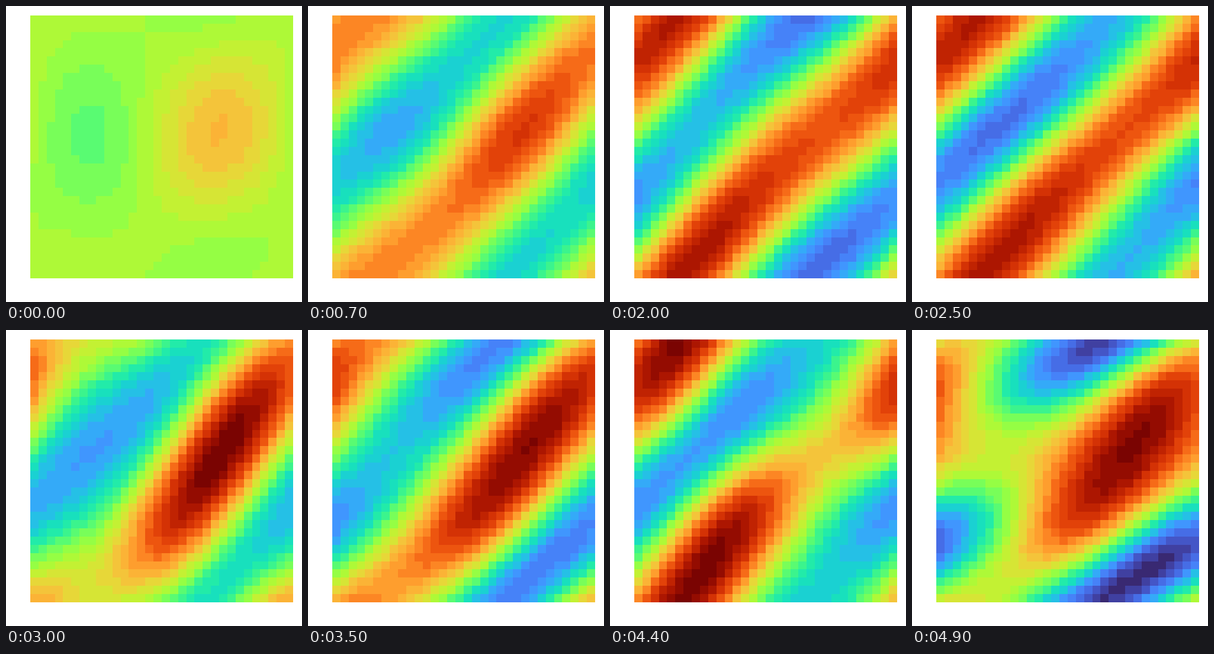
These frames come from a looping animation (500x500 px, 5 s). A matplotlib script:

```python
import numpy as np
import matplotlib.pyplot as plt
from matplotlib.animation import FuncAnimation

CELLS, LEVELS = 32, 32
FRAMES, INTERVAL = 50, 100

# Resting phases, in degrees, of the main diagonal wave and its disturbances.
MAIN, ACROSS, DOWN, COUNTER = 46, 76, 147, 98

y, x = np.mgrid[:CELLS, :CELLS] * 2 * np.pi / CELLS


def wave(kx, ky, phase):
    """Plane wave that fits the periodic square kx by ky times."""
    return np.cos(kx * x + ky * y - np.radians(phase))


def swing(t, peak, period):
    return np.cos(2 * np.pi * (t - peak) / period)


def field_at(t):
    """Colour levels of all cells after t seconds."""
    growth = 1 / (1 + 8 * np.exp(-4.4 * t))
    across = (5.3 * np.exp(-((t - 3.6) / 1.5) ** 2) * swing(t, 4.15, 2.1)
              - 1.7 * np.exp(-(t / 1.3) ** 2))
    down = (1.2 + 5.5 * (t / 4.9) ** 5) * swing(t, 4.9, 1.55)
    counter = 0.9 - 0.4 * t
    # The disturbances drain the main wave and couple with it.
    main = growth * (11 - 0.13 * across ** 2 - 0.05 * down ** 2)

    field = (16.1 + 0.5 * growth
             + main * wave(1, 1, MAIN)
             + across * wave(1, 0, ACROSS)
             + down * wave(0, 1, DOWN)
             + counter * wave(1, -1, COUNTER)
             + 0.055 * main * across * wave(2, 1, MAIN + ACROSS)
             - 0.04 * main * down * wave(1, 2, MAIN + DOWN))
    return np.clip(np.rint(field), 0, LEVELS - 1)


fig = plt.figure(figsize=(5, 5), dpi=100, facecolor="white")
ax = fig.add_axes([41 / 500, 40 / 500, 444 / 500, 444 / 500])
ax.axis("off")
image = ax.imshow(field_at(0), cmap=plt.get_cmap("turbo", LEVELS), vmin=-0.5,
                  vmax=LEVELS - 0.5, interpolation="nearest", aspect="auto")


def update(frame):
    image.set_data(field_at(frame * INTERVAL / 1000))
    return [image]


animation = FuncAnimation(fig, update, frames=FRAMES, interval=INTERVAL,
                          repeat=True, repeat_delay=0)
plt.show()
```
